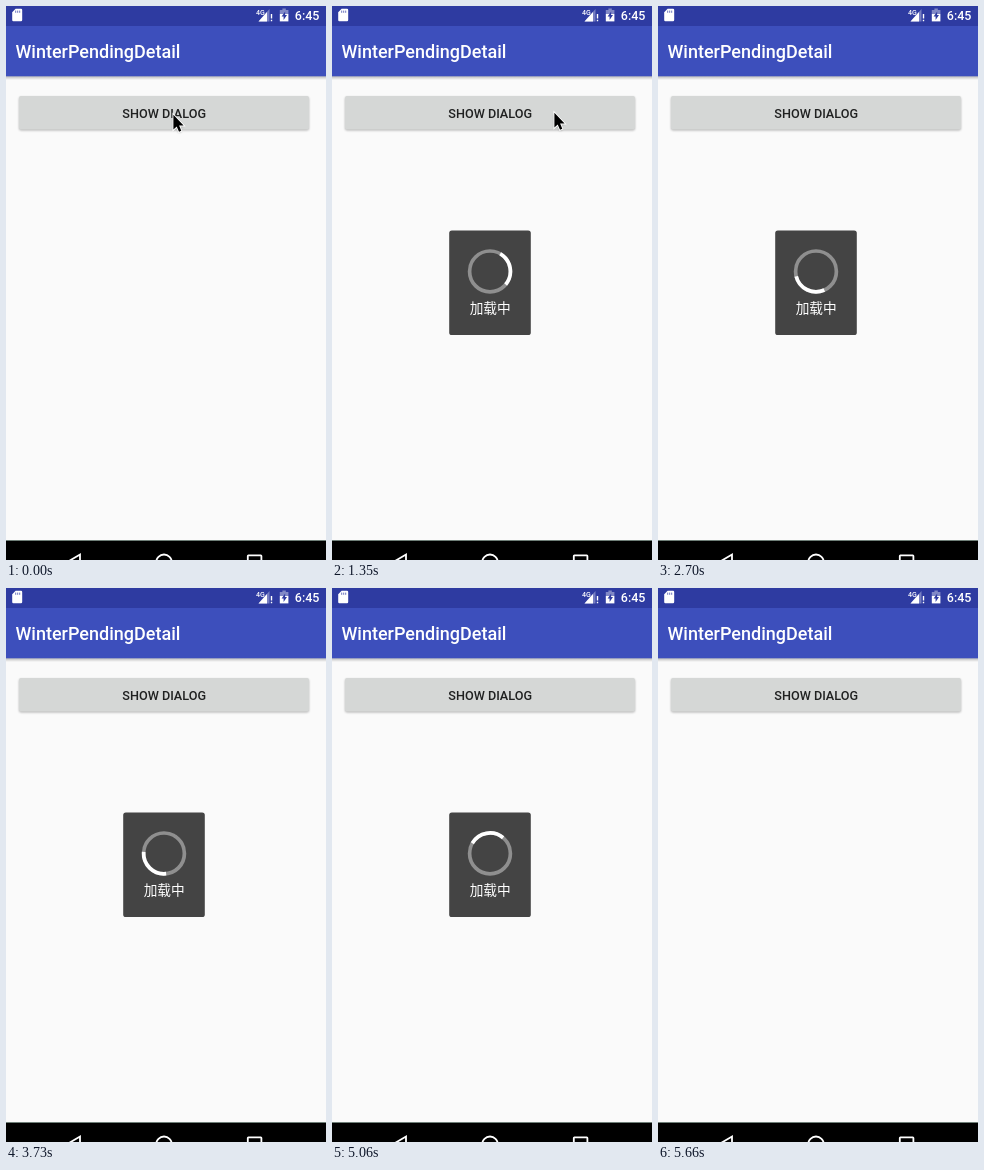
Recreate the animation shown at these times as an HTML page. Size 320 by 554 pixels, loop 6.26 s.

```html
<!DOCTYPE html>
<html lang="en">
<head>
<meta charset="utf-8">
<title>Loading dialog</title>
<style>
  html, body { margin: 0; width: 100%; height: 100%; overflow: hidden; background: #fafafa; }
  svg { display: block; width: 100%; height: 100%; }
  text { font-family: Roboto, "Noto Sans", sans-serif; font-weight: 500; }
  .cjk { font-family: "Noto Sans CJK SC", "Noto Sans CJK", sans-serif; font-weight: 400; }
</style>
</head>
<body>
<svg viewBox="0 0 320 554" xmlns="http://www.w3.org/2000/svg">
  <defs>
    <linearGradient id="barShadow" x2="0" y2="1">
      <stop stop-color="#000" stop-opacity=".26"/>
      <stop offset="1" stop-color="#000" stop-opacity="0"/>
    </linearGradient>
    <filter id="soft" x="-20%" y="-40%" width="140%" height="180%">
      <feGaussianBlur stdDeviation=".8"/>
    </filter>
    <clipPath id="buttonClip"><rect x="13" y="90" width="290" height="33.4" rx="2"/></clipPath>
  </defs>

  <rect width="320" height="554" fill="#fafafa"/>

  <!-- App bar and status bar -->
  <rect y="70" width="320" height="4" fill="url(#barShadow)"/>
  <rect y="20" width="320" height="50.3" fill="#3d4fbc"/>
  <rect width="320" height="20" fill="#2e3ba1"/>
  <text x="9.5" y="52" font-size="18" fill="#fff">WinterPendingDetail</text>

  <g fill="#fff">
    <path d="M9.6 2.8H15a1.2 1.2 0 0 1 1.2 1.2V14a1.2 1.2 0 0 1-1.2 1.2H7.4A1.2 1.2 0 0 1 6.2 14V6.2Z"/>
    <path d="M9.7 4.6v2.2M11.7 4.6v2.2M13.7 4.6v2.2" stroke="#2e3ba1" stroke-width=".7"/>
    <text x="250" y="8.8" font-size="7">4G</text>
    <path d="M263.5 3V15.4H252.5Z" opacity=".35"/>
    <path d="M261 6V15.4H252.5Z"/>
    <path d="M264.8 8h1.4v4.6h-1.4zM264.8 13.8h1.4v1.5h-1.4z"/>
    <path d="M276.4 2.6h3.4v1.3h2.6v4.2h-8.6V3.9h2.6z" opacity=".4"/>
    <path d="M273.8 8h8.6v7.4h-8.6z"/>
    <path d="M279.2 5.4 275.6 10.4h2v3.6l3.4-5h-1.9z" fill="#2e3ba1"/>
    <text x="288.8" y="14.2" font-size="12.5">6:45</text>
  </g>

  <!-- Button -->
  <rect id="buttonShadow" x="13" y="91" width="290" height="33.4" rx="2" fill="#000" filter="url(#soft)"/>
  <rect x="13" y="90" width="290" height="33.4" rx="2" fill="#d5d7d6"/>
  <g clip-path="url(#buttonClip)">
    <rect id="pressed" x="13" y="90" width="290" height="34" fill="#000"/>
    <circle id="ripple" cx="167" cy="107" fill="#000"/>
  </g>
  <text x="158.2" y="111.7" font-size="12.65" text-anchor="middle" fill="#202121">SHOW DIALOG</text>

  <!-- Navigation bar -->
  <rect y="534" width="320" height="1" fill="#6f7f78"/>
  <rect y="535" width="320" height="19" fill="#000"/>
  <g fill="none" stroke="#fff" stroke-width="1.8">
    <path d="M74 548.5V564L61 556.2Z"/>
    <circle cx="158" cy="556.3" r="7.8"/>
    <rect x="241.8" y="549.4" width="13.6" height="13.6" rx=".6"/>
  </g>

  <g id="dialog">
    <rect x="117.2" y="224.5" width="81.6" height="104.6" rx="2.6" fill="#444"/>
    <g fill="none" stroke="#fff" stroke-width="3.7">
      <circle cx="158" cy="265.4" r="20.4" opacity=".4"/>
      <path id="arc"/>
    </g>
    <text class="cjk" x="158.2" y="307" font-size="13.7" text-anchor="middle" fill="#fff">加载中</text>
  </g>

  <g id="cursor">
    <path d="M0 1V16L3.5 12.8 5.8 18 8.4 16.9 6.2 11.7H11Z" fill="#000" opacity=".35" filter="url(#soft)"/>
    <path d="M.4 0V14.8L3.7 11.7 6 17 8.3 16 6.1 10.8H10.6Z" fill="#000" stroke="#fff" stroke-width="1.8" paint-order="stroke"/>
  </g>
</svg>
<script>
const LOOP = 6260, OPEN = 450, TICK = 150, LAST = 35;
const SHORT_TICKS = [15, 21, 27, 30]; // these last 140 ms
const CENTER = { x: 158, y: 265.4, r: 20.4 };
const $ = id => document.getElementById(id);
const clamp = v => Math.max(0, Math.min(1, v));
const ease = v => v * v * (3 - 2 * v);
const set = (id, attrs) => {
  for (const key in attrs) $(id).setAttribute(key, attrs[key]);
};

const tickStart = n => OPEN + n * TICK - 10 * SHORT_TICKS.filter(s => s < n).length;

// The screen refreshes in discrete ticks; -1 is the idle state before the tap.
function tickAt(time) {
  let n = -1;
  while (n < LAST && time >= tickStart(n + 1)) n++;
  return n;
}

function point(degrees) {
  const a = degrees * Math.PI / 180;
  return `${CENTER.x + CENTER.r * Math.cos(a)} ${CENTER.y + CENTER.r * Math.sin(a)}`;
}

function drawDialog(n) {
  const visible = n >= 1 && n < LAST;
  const opening = n === 1, closing = n === LAST - 1;
  const alpha = !visible ? 0 : opening ? .53 : closing ? .5 : 1;
  const scale = opening || closing ? .957 : 1;
  set('dialog', {
    opacity: alpha,
    transform: `translate(158 276.8) scale(${scale}) translate(-158 -276.8)`
  });
  const middle = 54 * n - 334 - (opening ? 12 : 0);
  set('arc', { d: `M${point(middle - 50)}A${CENTER.r} ${CENTER.r} 0 0 1 ${point(middle + 50)}` });
}

function drawPress(n) {
  const active = n >= 0 && n < 4;
  const fade = active ? 1 - Math.max(0, n - 1) / 3 : 0;
  set('pressed', { opacity: .025 * fade });
  set('ripple', { r: active ? 10 + 26 * n + 8 * n * Math.max(0, n - 1) : 0, opacity: .045 * fade });
  set('buttonShadow', { opacity: active ? .34 : .27 });
}

function drawCursor(n) {
  const move = ease(clamp((n - 1) / 4));
  set('cursor', {
    transform: `translate(${167 + 55 * move} ${108.8 - 2 * move})`,
    visibility: n < 10 ? 'visible' : 'hidden'
  });
}

function render(time) {
  const n = tickAt(time % LOOP);
  drawDialog(n);
  drawPress(n);
  drawCursor(n);
}

const start = performance.now();
function frame() {
  render(performance.now() - start);
  requestAnimationFrame(frame);
}
frame();
</script>
</body>
</html>
```
